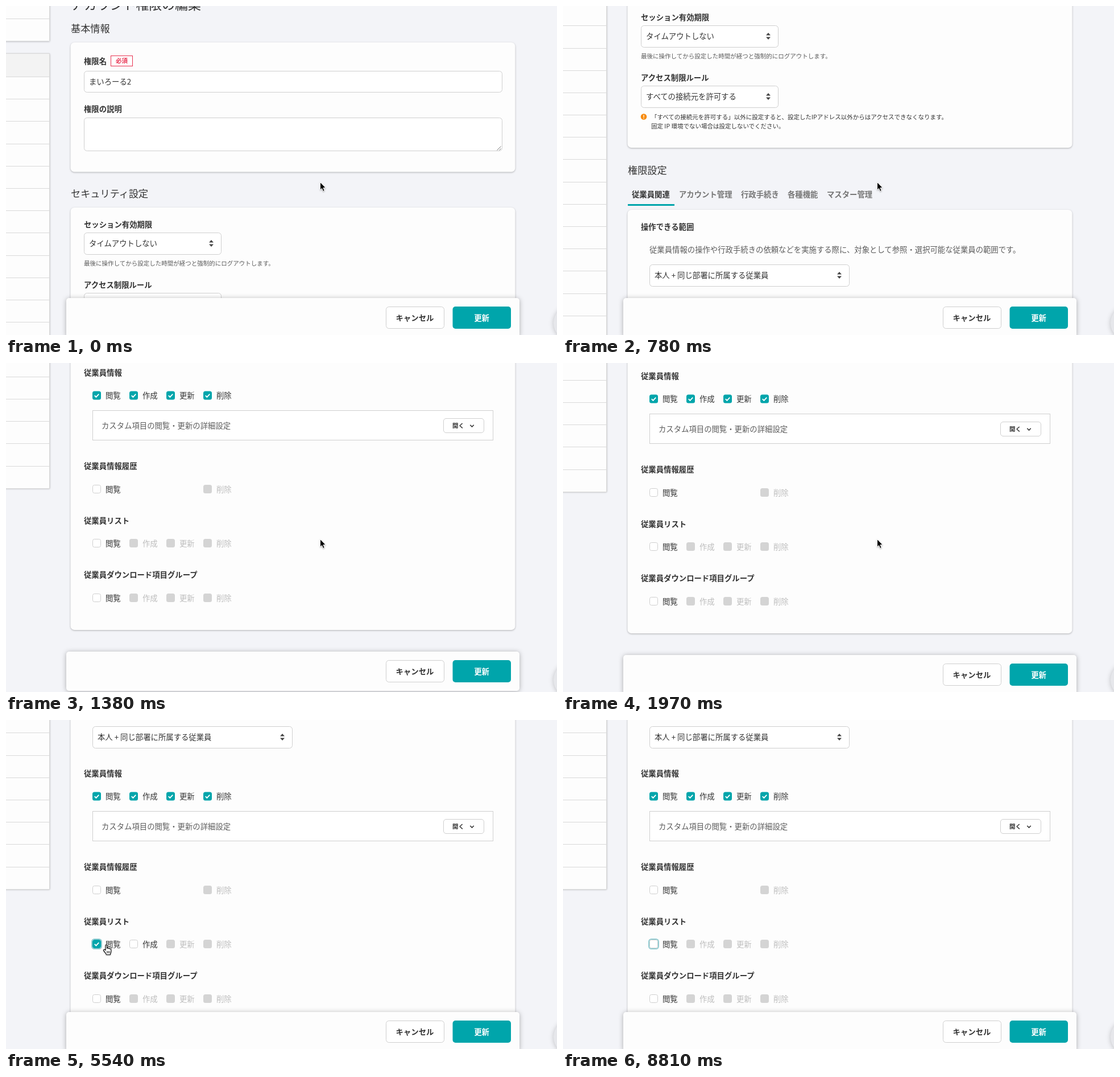
Recreate the animation shown at these times as an HTML page. Size 969 by 578 pixels, loop 9.11 s.

```html
<!DOCTYPE html>
<html lang="ja">
<head>
<meta charset="utf-8">
<title>権限の編集</title>
<style>
  html, body { margin: 0; width: 100%; height: 100%; overflow: hidden; background: #f3f4f8; }
  svg { display: block; }
  text { font-family: "Noto Sans CJK JP", "Noto Sans CJK", sans-serif; fill: #333; white-space: pre; }
  .b { font-weight: 700; }
  .mid { text-anchor: middle; }
  .soft { fill: #5c5c5c; }
  .tab { fill: #767676; }
  .off { fill: #bdbdbd; }
  .red { fill: #e8304f; }
  .inv { fill: #fff; }
  .card { fill: #fdfdfd; filter: drop-shadow(0 1px 1.5px rgba(0, 0, 0, .28)); }
  .bar { fill: #fdfdfd; filter: drop-shadow(0 1px 4px rgba(0, 0, 0, .3)); }
  .field { fill: #fff; stroke: #cfcfcf; }
  .teal { fill: #00a5ab; }
  .line { stroke: #d9d9d9; }
</style>
</head>
<body>
<svg width="969" height="578" viewBox="0 0 969 578">
  <g id="page"></g>
  <circle cx="994" cy="557" r="31" fill="#e6e7eb" style="filter:drop-shadow(0 1px 4px rgba(0,0,0,.22))"/>
  <g id="footer"></g>
  <g id="arrow" style="filter:drop-shadow(0 1px 1px rgba(0,0,0,.3))">
    <path d="M.5 .5V14.2L3.5 11.4 5.7 16.6 8.2 15.6 6 10.5H10.2Z" fill="#000" stroke="#fff" stroke-linejoin="round"/>
  </g>
  <g id="hand" style="filter:drop-shadow(0 1px 1px rgba(0,0,0,.3))">
    <path d="M-.9 9.6V1.2C-.9-.6 1.7-.6 1.7 1.2V6.2C2.2 5 4.2 5.2 4.3 6.6 5 5.6 6.6 5.9 6.7 7.3 7.6 6.6 8.8 7.1 8.8 8.4V11.6C8.8 13.6 7.6 14.4 7.4 17.2H.4C.2 15.2-2 13.4-4.2 10.4-5.2 9-3.6 7.6-2.3 8.5Z" fill="#fff" stroke="#000" stroke-width="1.1" stroke-linejoin="round"/>
    <path d="M1.8 11V14.6M3.9 11V14.6M6 11V14.6" stroke="#000" stroke-width=".9"/>
  </g>
</svg>
<script>
const LOOP = 9110, MAX_SCROLL = 878;
const $ = id => document.getElementById(id);
const BODY = 13.36, SMALL = 10.5, HEAD = 17.17;

// y is the vertical centre of the glyphs
const text = (x, y, str, cls = '', size = BODY) =>
  `<text x="${x}" y="${y + size * .38}" font-size="${size}" class="${cls}">${str}</text>`;
const rect = (x, y, w, h, r, cls, extra = '') =>
  `<rect x="${x}" y="${y}" width="${w}" height="${h}" rx="${r}" class="${cls}" ${extra}/>`;
const field = (x1, y1, x2, y2, r = 5) =>
  rect(x1 + .5, y1 + .5, x2 - x1 - 1, y2 - y1 - 1, r, 'field');
const path = (d, extra) => `<path d="${d}" ${extra}/>`;

const select = (x1, y, x2, label) => {
  const cx = x2 - 18, cy = y + 19;
  return field(x1, y, x2, y + 39) + text(x1 + 9, cy, label) +
    path(`M${cx - 4} ${cy - 1.4}h8l-4-4.6zM${cx - 4} ${cy + 1.4}h8l-4 4.6z`, 'fill="#444"');
};

const check = (x, y, label, state) => {
  const top = y - 7.5;
  const box = state === 'on'
    ? rect(x, top, 15, 15, 3.5, 'teal') +
      path(`M${x + 3.8} ${y + .2}l2.6 2.7 4.9-5.3`, 'fill="none" stroke="#fff" stroke-width="1.8"')
    : state === 'off'
      ? rect(x, top, 15, 15, 3.5, '', 'fill="#d4d4d4"')
      : rect(x + .5, top + .5, 14, 14, 3, 'field');
  return box + text(x + 23, y, label, state === 'off' ? 'off' : '');
};
const ACTIONS = ['閲覧', '作成', '更新', '削除'];
const checkRow = (y, states) => states.map((s, i) =>
  s ? check(152 + 65 * i, y, ACTIONS[i], s) : '').join('');

const rows = (from, n) => Array.from({ length: n }, (_, i) =>
  path(`M0 ${Math.round(from + i * 39.19) + .5}H77`, 'class="line"')).join('');

const side = rect(-9, -60, 86, 121.5, 1, 'card') + rows(22, 1) +
  rect(-9, 83, 86, 1021, 1, 'card') + rect(0, 83, 77, 41, 0, '', 'fill="#f3f3f3"') +
  rows(83, 1) + rows(124, 26) + path('M76.5 83V1104M76.5 0V61', 'class="line"');

const profile = text(114, -3, 'アカウント権限の編集', '', 22.9) +
  text(114, 39.5, '基本情報', '', HEAD) + rect(113.5, 64, 782, 227.5, 7, 'card') +
  text(137, 96.5, '権限名', 'b') +
  rect(184.5, 87.5, 38, 18, 0, '', 'fill="#fff" stroke="#e8304f"') +
  text(203.5, 96.5, '必須', 'b mid red', SMALL) +
  field(137, 114, 873, 152) + text(146, 132.5, 'まいろーる2') +
  text(137, 181, '権限の説明', 'b') + field(137, 196, 873, 255) +
  path('M863.5 253.5l7-7M867.5 253.5l3-3', 'stroke="#777"');

const security = text(114, 329.5, 'セキュリティ設定', '', HEAD) +
  rect(113.5, 354, 782, 259, 7, 'card') +
  text(137, 383.5, 'セッション有効期限', 'b') + select(137, 398, 379, 'タイムアウトしない') +
  text(137, 452.5, '最後に操作してから設定した時間が経つと強制的にログアウトします。', 'soft', SMALL) +
  text(137, 490, 'アクセス制限ルール', 'b') + select(137, 504, 379, 'すべての接続元を許可する') +
  '<circle cx="142" cy="558.5" r="5.3" fill="#f78b0c"/>' +
  path('M142 555.4v3.8M142 560.3v1.5', 'stroke="#fff" stroke-width="1.4"') +
  text(155, 559, '「すべての接続元を許可する」以外に設定すると、設定したIPアドレス以外からはアクセスできなくなります。', '', SMALL) +
  text(155, 575, '固定 IP 環境でない場合は設定しないでください。', '', SMALL);

const roles = text(114, 652, '権限設定', '', HEAD) +
  text(121, 694.5, '従業員関連', 'b') +
  [[204, 'アカウント管理'], [313, '行政手続き'], [395, '各種機能'], [464, 'マスター管理']]
    .map(([x, s]) => text(x, 694.5, s, 'b tab')).join('') +
  rect(113.5, 722, 782, 631, 7, 'card') + rect(114, 712, 82, 3, 0, 'teal') +
  text(137, 751.5, '操作できる範囲', 'b') +
  text(152, 791.5, '従業員情報の操作や行政手続きの依頼などを実施する際に、対象として参照・選択可能な従業員の範囲です。', 'soft') +
  select(152, 818, 504, '本人 + 同じ部署に所属する従業員') +
  text(137, 900.5, '従業員情報', 'b') + checkRow(941, ['on', 'on', 'on', 'on']) +
  field(152, 967, 857, 1020, 0) +
  text(168, 993.5, 'カスタム項目の閲覧・更新の詳細設定', 'soft') +
  field(769, 981, 841, 1007, 4.5) + text(785, 994.5, '開く', 'b', SMALL) +
  path('M816.3 992.8l3.2 3.2 3.2-3.2', 'fill="none" stroke="#333" stroke-width="1.6"') +
  text(137, 1065, '従業員情報履歴', 'b') + checkRow(1105.5, ['empty', '', '', 'off']) +
  text(137, 1160.5, '従業員リスト', 'b') + '<g id="list"></g>' +
  text(137, 1256, '従業員ダウンロード項目グループ', 'b') +
  checkRow(1296.5, ['empty', 'off', 'off', 'off']);

$('page').innerHTML = side + profile + security + roles;
$('footer').innerHTML = rect(106, 513, 797, 69, 5, 'bar') +
  field(668, 528, 771, 567) + text(719, 547.5, 'キャンセル', 'b mid') +
  rect(785.5, 528, 102.5, 39, 5, 'teal') + text(836.5, 547.5, '更新', 'b mid inv');

// Each track is [time, value...], held until the next entry
const scrollTrack = [[0, 0], [480, 42], [630, 184], [780, 364], [930, 572], [1080, 748],
  [1230, 858], [1380, 884], [1530, 882], [1680, 880], [1830, 879], [1970, 878], [4060, 807]];

const cursorTrack = [[0, 552, 309, 'arrow'], [2120, 512, 310, 'arrow'], [2270, 386, 314, 'arrow'],
  [2420, 236, 317, 'arrow'], [2570, 179, 318, 'arrow'], [2710, 181, 323, 'hand'],
  [3610, 169, 324, 'hand'], [4660, 169, 332, 'arrow'], [4810, 170, 344, 'arrow'],
  [4960, 171, 358, 'arrow'], [5100, 172, 371, 'arrow'], [5250, 174, 385, 'hand'],
  [5400, 175, 391, 'hand'], [5540, 176, 395, 'hand'], [7630, 190, 397, 'hand'],
  [7780, 287, 414, 'arrow'], [7930, 480, 452, 'arrow'], [8070, 617, 493, 'arrow'],
  [8220, 678, 517, 'arrow'], [8520, 772, 540, 'arrow'], [8660, 861, 564, 'arrow'], [8810, 0, 0, '']];

const RING = '#93ccd2';
const listTrack = [[0, false, '', '#fff'], [3610, false, '#cfe4e1', '#fff'], [3760, false, RING, '#fff'],
  [4060, true, RING, ''], [5840, true, '#b5dde0', ''], [5980, false, RING, '#fff'],
  [6580, false, RING, '#f1f4f4'], [6880, true, RING, ''], [7180, true, '#b5dde0', ''],
  [7330, false, RING, '#fff']];

const at = (track, t) => track.findLast(k => k[0] <= t);

let shown;
function drawList(key) {
  if (key === shown) return;
  shown = key;
  const [, on, ring, fill] = key, y = 1200.5;
  const halo = ring ? rect(151, y - 8.5, 17, 17, 4.5, '', `fill="none" stroke="${ring}" stroke-width="2"`) : '';
  const pressed = fill && fill !== '#fff' ? rect(153, y - 6.5, 13, 13, 2.5, '', `fill="${fill}"`) : '';
  $('list').innerHTML = checkRow(y, on ? ['on', 'empty', 'off', 'off'] : ['empty', 'off', 'off', 'off']) + pressed + halo;
}

function frame() {
  const t = performance.now() % LOOP;
  const scroll = at(scrollTrack, t)[1];
  $('page').setAttribute('transform', `translate(0 ${-scroll})`);
  $('footer').setAttribute('transform', `translate(0 ${-Math.max(0, scroll - MAX_SCROLL)})`);
  const [, x, y, kind] = at(cursorTrack, t);
  for (const id of ['arrow', 'hand']) {
    $(id).setAttribute('transform', `translate(${x} ${y})`);
    $(id).setAttribute('visibility', id === kind ? 'visible' : 'hidden');
  }
  drawList(at(listTrack, t));
  requestAnimationFrame(frame);
}
frame();
</script>
</body>
</html>
```
